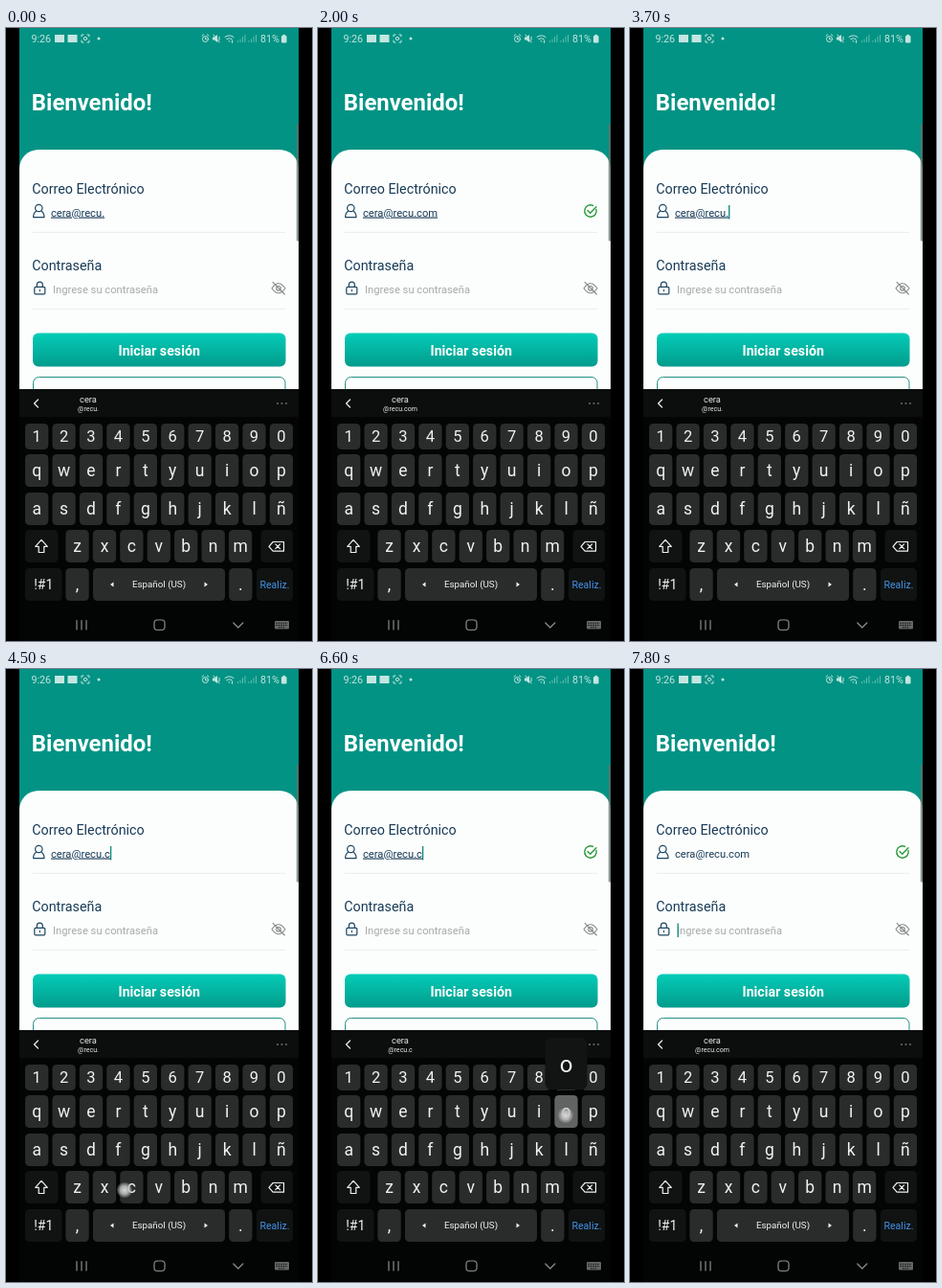
Recreate the animation shown at these times as an HTML page. Size 320 px wide and 640 px high, loop 8000 ms.

```html
<!DOCTYPE html>
<html lang="es">
<head>
<meta charset="utf-8">
<title>Inicio de sesión</title>
<style>
  html, body { margin: 0; width: 100%; height: 100%; overflow: hidden; background: #000; }
  svg { display: block; width: 320px; height: 640px; font-family: Roboto, "Open Sans", sans-serif; }
  .mid { text-anchor: middle; }
  .label { font-size: 14.3px; fill: #173a57; }
  .field { font-size: 11.2px; fill: #173a57; }
  .line { fill: none; stroke-linecap: round; stroke-linejoin: round; }
  .navy { stroke: #1d4560; stroke-width: 1.2; }
  .key { fill: #292c2b; }
  .key.dark { fill: #101312; }
  .key.down { fill: #626463; }
  .cap { fill: #f0f2f1; text-anchor: middle; }
  .status { stroke: #c4e6e1; stroke-width: 1; }
  .nav { stroke: #8b8d8c; stroke-width: 1.2; }
</style>
</head>
<body>
<svg viewBox="0 0 320 640">
  <defs>
    <linearGradient id="button" x2="0" y2="1">
      <stop offset="0" stop-color="#04cdb7"/>
      <stop offset="1" stop-color="#029b8c"/>
    </linearGradient>
    <radialGradient id="dotFill">
      <stop offset="0" stop-color="#d8d8d8"/>
      <stop offset=".55" stop-color="#c2c2c2" stop-opacity=".85"/>
      <stop offset="1" stop-color="#a8a8a8" stop-opacity=".25"/>
    </radialGradient>
    <clipPath id="app"><rect x="14" width="292" height="377"/></clipPath>
  </defs>
  <rect width="320" height="640"/>

  <g clip-path="url(#app)">
    <rect x="14" width="292" height="377" fill="#029384"/>
    <rect x="14" y="127" width="292" height="290" rx="20" fill="#fcfefd"/>
    <text x="26.8" y="85.5" font-size="23.9" font-weight="700" fill="#fff">Bienvenido!</text>

    <text class="label" x="27.2" y="173">Correo Electrónico</text>
    <g class="line navy">
      <circle cx="34.3" cy="188" r="3.7"/>
      <path d="M31.5 191.2C29.5 192.5 28.6 194.5 28.6 197.6H40C40 194.5 39.1 192.5 37.1 191.2"/>
      <rect x="29.8" y="270.3" width="11" height="7.6" rx="1.2"/>
      <path d="M32.3 270V268.2a3 3 0 0 1 6 0V270M35.3 273.4v1.2"/>
    </g>
    <text class="field" id="mail" x="47" y="196.5"></text>
    <g id="check" class="line" stroke="#2b9a3c" stroke-width="1.4">
      <path d="M291 189.5A6.2 6.2 0 1 1 287.6 185.4"/>
      <path d="M282 190.6l2.7 2.7 6.3-6.6"/>
    </g>
    <path d="M28 213.3H292M28 293.3H292" stroke="#e9eceb"/>

    <text class="label" x="27.2" y="253">Contraseña</text>
    <text class="field" x="49" y="276.6" style="fill:#a6a9a8">Ingrese su contraseña</text>
    <g class="line" stroke="#858888" stroke-width="1.1">
      <path d="M278 271.8Q285 261.8 292 271.8Q285 281.8 278 271.8Z"/>
      <circle cx="285" cy="271.8" r="2.3"/>
      <path d="M279 265.3L291.3 278"/>
    </g>
    <rect id="caret" width="1.3" height="14.5" fill="#07877b"/>

    <rect x="28" y="318.5" width="264.5" height="35" rx="6" fill="url(#button)"/>
    <text class="mid" x="160.2" y="341.5" font-size="14.2" font-weight="700" fill="#fff">Iniciar sesión</text>
    <rect x="28.5" y="364.5" width="263.5" height="35" rx="6" fill="none" stroke="#238f83"/>
    <rect x="303.8" y="100" width="2.4" height="122.5" rx="1" fill="#63706e" fill-opacity=".75"/>

    <g fill="#c4e6e1">
      <text x="26.5" y="15" font-size="10.7">9:26</text>
      <rect x="51" y="7" width="10" height="8"/>
      <rect x="64.5" y="7" width="10" height="8"/>
      <circle cx="97" cy="11" r="1.5"/>
      <text x="266" y="15" font-size="10.7">81%</text>
      <rect x="288" y="8" width="5.5" height="7.5" rx="1"/>
      <rect x="289.5" y="6.8" width="2.5" height="1.5"/>
      <path d="M216 9.5h2l3-2.5v8l-3-2.5h-2z"/>
    </g>
    <g class="line status">
      <path d="M79 9V7h2M85 7h2v2M87 13v2h-2M81 15h-2v-2"/>
      <circle cx="83" cy="11" r="1.7"/>
      <circle cx="208.5" cy="11.5" r="3"/>
      <path d="M208.5 10v1.7h1.4M205 8.2l1.6-1.4M212 8.2l-1.6-1.4M217 7l6 8M223 9.3v3.5"/>
      <path d="M229 9.5q4.5-3.5 9 0M230.8 11.6q2.7-2 5.4 0M233 13.8h1M236.5 13v2.3"/>
      <path d="M242.5 14.5v-1M245 14.5v-2.5M247.5 14.5v-5M250 14.5v-7M254 14.5v-1M256.5 14.5v-2.5M259 14.5v-5M261.5 14.5v-7" opacity=".5"/>
    </g>
  </g>

  <rect x="14" y="377" width="292" height="263" fill="#030504"/>
  <rect x="14" y="377" width="292" height="29" fill="#0b0e0d"/>
  <path class="line" d="M33.5 388l-4 4 4 4" stroke="#e6e8e7" stroke-width="1.3"/>
  <g class="mid" fill="#e9ebea">
    <text x="86" y="391" font-size="9.3">cera</text>
    <text id="hint" x="86" y="400" font-size="7.1"></text>
  </g>
  <g fill="#646766">
    <circle cx="284" cy="392" r="1.1"/><circle cx="288.5" cy="392" r="1.1"/><circle cx="293" cy="392" r="1.1"/>
  </g>

  <g id="keys"></g>
  <g class="line" stroke="#f0f2f1" stroke-width="1.2">
    <path d="M37 534.3l6.3 7H39.8v6.2H34.2v-6.2H30.7z"/>
    <path d="M279.2 536.5H290.5V546.2H279.2L275 541.3zM281.8 538.9l4.8 4.8M286.6 538.9l-4.8 4.8"/>
  </g>
  <path d="M112.5 578.5v5l-3.5-2.5zM207.5 578.5v5l3.5-2.5z" fill="#f0f2f1"/>

  <g class="line nav">
    <path d="M74 618.5v9.5M79 618.5v9.5M84 618.5v9.5"/>
    <rect x="155" y="618" width="11" height="10.5" rx="3.2"/>
    <path d="M237.8 621l5 5 5-5"/>
  </g>
  <rect x="281" y="619" width="15" height="8.5" rx="1" fill="#646766"/>
  <path d="M282.5 621.3h12M282.5 623.5h12M285 625.8h7" stroke="#080a09" stroke-width="1" stroke-dasharray="1.4 1"/>

  <g id="popup">
    <rect width="44" height="54" rx="6" fill="#111413"/>
    <text class="cap" x="22" y="36" font-size="24"></text>
  </g>
  <circle id="dot" r="8" fill="url(#dotFill)"/>
</svg>

<script>
const $ = id => document.getElementById(id);
const LOOP = 8000, STEP = 100;
const USER = 'cera', HOST = '@recu.';

const keys = {};
let markup = '';
function addKey(label, x, y, w, h, size = 17.5, dark = '', color = '') {
  const cx = x + w / 2;
  markup += `<rect class="key ${dark}" data-key="${label}" x="${x}" y="${y}" width="${w}" height="${h}" rx="4.5"/>`;
  if (label.length !== 3 || label === '!#1')
    markup += `<text class="cap" x="${cx}" y="${y + h / 2 + size * .34}" font-size="${size}" style="fill:${color}">${label}</text>`;
  keys[label] = { cx, y };
}
function addRow(chars, x, y, h, size) {
  [...chars].forEach((c, i) => addKey(c, x + i * 28.42, y, 24.3, h, size));
}
addRow('1234567890', 20, 413, 27, 16.5);
addRow('qwertyuiop', 20, 445, 34);
addRow('asdfghjklñ', 20, 485, 34);
addRow('zxcvbnm', 62.4, 524, 34);
addKey('cap', 20, 524, 34.5, 34, 0, 'dark');
addKey('del', 266.5, 524, 33.5, 34, 0, 'dark');
addKey('!#1', 20, 564, 38.5, 34, 14, 'dark');
addKey(',', 62.4, 564, 24.3, 34);
addKey('Español (US)', 91, 564, 138, 34, 9.8);
addKey('.', 233.2, 564, 24.3, 34);
addKey('Realiz.', 262, 564, 38, 34, 10.6, 'dark', '#4292e6');
$('keys').innerHTML = markup;
for (const r of document.querySelectorAll('[data-key]')) keys[r.dataset.key].rect = r;

// [time, ending of the address]
const typed = [[0, ''], [500, 'c'], [800, 'co'], [1500, 'com'], [2900, 'co'], [3100, 'c'], [3400, ''],
  [4500, 'c'], [5000, ''], [5600, 'c'], [6700, 'co'], [7000, 'com']];
const hinted = [[0, ''], [600, 'c'], [900, 'co'], [1600, 'com'], [3000, 'co'], [3300, 'c'], [3700, ''],
  [4700, 'c'], [5200, ''], [5800, 'c'], [6800, 'co'], [7100, 'com']];
// [start, end, key]
const presses = [[300, 500, 'c'], [700, 800, 'o'], [1300, 1500, 'm'], [2800, 3000, 'del'], [3100, 3200, 'del'],
  [3300, 3500, 'del'], [4400, 4500, 'c'], [4900, 5100, 'del'], [5500, 5600, 'c'], [6500, 6700, 'o'], [6900, 7000, 'm']];
// [start, end, x, y, opacity]
const touches = [[200, 600, 125, 543, 1], [700, 1000, 259, 466, 1], [1200, 1600, 245, 540, 1], [1600, 2000, 245, 538, .15],
  [2800, 3700, 283, 543, 1], [4400, 4600, 124, 544, 1], [4800, 5200, 283, 543, 1], [5300, 5800, 119.5, 543.5, 1],
  [6400, 6800, 259, 466, 1], [6900, 7100, 246, 541, 1], [7500, 7700, 230, 275, 1]];
const FOCUS_MOVE = 7700, CARET_START = -800;

const latest = (list, t) => list.filter(e => e[0] <= t).pop();
const during = (list, t) => list.find(e => e[0] <= t && t < e[1]);
const show = (el, on) => el.setAttribute('visibility', on ? 'visible' : 'hidden');
const setText = (el, s) => { if (el.textContent !== s) el.textContent = s; };
const place = (el, x, y) => el.setAttribute('transform', `translate(${x} ${y})`);

function render(time) {
  const t = Math.floor(time / STEP) * STEP;
  const [since, ending] = latest(typed, t);
  const onPassword = t >= FOCUS_MOVE;
  const mail = $('mail');
  setText(mail, USER + HOST + ending);
  mail.setAttribute('text-decoration', onPassword ? 'none' : 'underline');
  setText($('hint'), HOST + latest(hinted, t)[1]);
  // validation lags one step behind the typing
  show($('check'), latest(typed, Math.max(0, t - STEP))[1] !== '');

  const blinkFrom = onPassword ? FOCUS_MOVE : since || CARET_START;
  show($('caret'), Math.floor((t - blinkFrom) / 500) % 2 === 0);
  if (onPassword) place($('caret'), 49.5, 265.5);
  else place($('caret'), 47 + mail.getComputedTextLength(), 185);

  const press = during(presses, t);
  const down = press && press[2];
  for (const name in keys) keys[name].rect.classList.toggle('down', name === down);
  const popup = $('popup');
  const letter = down && down !== 'del';
  show(popup, letter);
  if (letter) {
    place(popup, keys[down].cx - 22, keys[down].y - 60);
    setText(popup.querySelector('text'), down);
  }

  const touch = during(touches, t);
  show($('dot'), touch);
  if (touch) {
    place($('dot'), touch[2], touch[3]);
    $('dot').setAttribute('opacity', touch[4]);
  }
}

const start = performance.now();
function tick() {
  render((performance.now() - start) % LOOP);
  requestAnimationFrame(tick);
}
tick();
</script>
</body>
</html>
```
